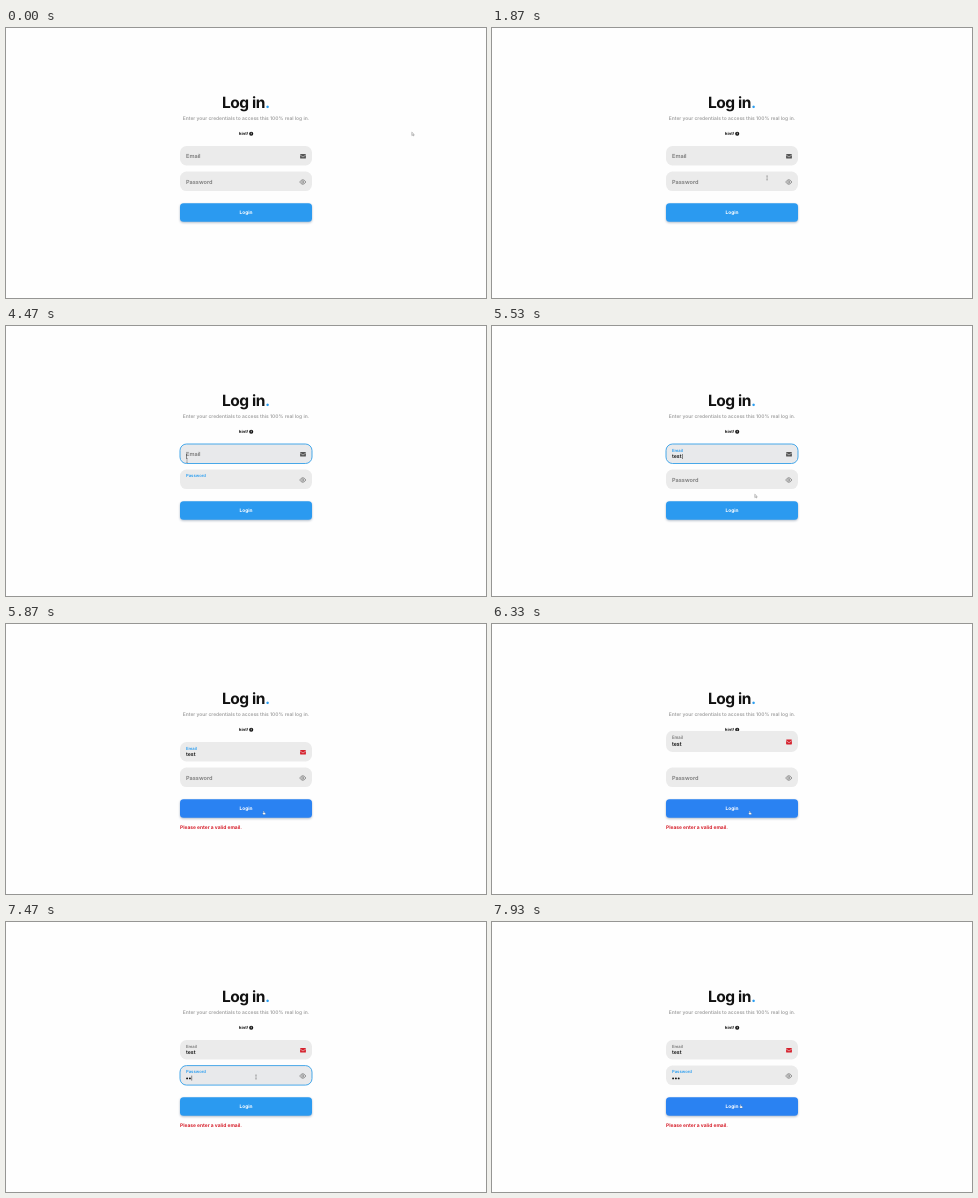
These frames come from a looping animation (480 by 270 pixels, 8 s). An HTML page:

```html
<!DOCTYPE html>
<html lang="en">
<head>
<meta charset="utf-8">
<title>Log in</title>
<style>
  html, body { margin: 0; width: 100%; height: 100%; overflow: hidden; background: #fefefe; }
  svg { display: block; width: 100vw; height: 100vh; }
  text { font-family: Inter, "Open Sans", sans-serif; font-weight: 600; text-rendering: geometricPrecision; }
  .bold { font-weight: 700; }
  .field { transform-box: fill-box; transform-origin: center bottom; }
  .box { fill: #ebebeb; }
  .focused .box { fill: #e8e9eb; stroke: #35a0e8; stroke-width: .9; }
  .label { font-size: 5.6px; }
  .value { font-size: 5.2px; fill: #111; }
  #button { filter: drop-shadow(0 1px 1px rgba(30, 60, 100, .35)); }
</style>
</head>
<body>
<svg viewBox="0 0 480 270">
  <defs>
    <g id="envelope">
      <rect x="-2.9" y="-2.2" width="5.8" height="4.5" rx=".6"/>
      <path d="M-2.9-1.2L0 .8 2.9-1.2" fill="none" stroke="#ebebeb" stroke-width=".55"/>
    </g>
    <g id="eye" fill="none" stroke="#666" stroke-width=".65">
      <path d="M-3.1 0Q0-4.6 3.1 0Q0 4.6-3.1 0Z"/>
      <circle r="1.1"/>
    </g>
  </defs>

  <text class="bold" x="216" y="80.2" font-size="15.5" letter-spacing="-.45" fill="#111">Log in<tspan fill="#2a9df0">.</tspan></text>
  <text x="240" y="91.5" font-size="4.92" text-anchor="middle" fill="#a2a2a2">Enter your credentials to access this 100% real log in.</text>
  <text class="bold" x="232.8" y="107.3" font-size="4.2" fill="#111">hint!</text>
  <circle cx="245.2" cy="105.8" r="2.05" fill="#111"/>
  <text class="bold" x="245.2" y="107" font-size="3.2" text-anchor="middle" fill="#fff">?</text>

  <g id="email" class="field">
    <rect class="box" x="174" y="118" width="132" height="19.5" rx="6.5"/>
    <text class="label">Email</text>
    <text class="value" x="180" y="132.3"></text>
    <rect class="caret" y="128" width=".5" height="5" fill="#222"/>
    <use id="mail" href="#envelope" x="297" y="128.2"/>
  </g>

  <g id="password" class="field">
    <rect class="box" x="174" y="143.6" width="132" height="19.5" rx="6.5"/>
    <text class="label">Password</text>
    <g class="dots" fill="#111">
      <circle cx="181.1" cy="156.4" r=".95"/>
      <circle cx="183.9" cy="156.4" r=".95"/>
      <circle cx="186.7" cy="156.4" r=".95"/>
    </g>
    <rect class="caret" y="153.6" width=".5" height="5" fill="#222"/>
    <use href="#eye" x="296.8" y="154"/>
  </g>

  <rect id="button" x="174" y="175.2" width="132" height="18.6" rx="3.5"/>
  <text class="bold" x="240" y="186" font-size="4.8" text-anchor="middle" fill="#fff">Login</text>
  <text id="error" class="bold" x="174" y="205.1" font-size="4.9" fill="#d6212d">Please enter a valid email.</text>

  <g id="cursor">
    <path id="arrow" d="M-1.2-1.8V1.5L-.4.8 .2 2 .8 1.7 .3.6H1.3Z" fill="#fff" stroke="#777" stroke-width=".45"/>
    <path id="beam" d="M-.8-2H.8M-.8 2H.8M0-2V2" fill="none" stroke="#777" stroke-width=".5"/>
    <path id="hand" d="M-.6-1.9H.1V-.5L1.4-.1V1.6H-.9L-1.5.1-.6 0Z" fill="#fff" stroke="#456" stroke-width=".2"/>
  </g>
</svg>

<script>
const LOOP = 8000, FPS = 15;
const BLUE = [42, 157, 240], GREY = [122, 122, 122];
const $ = selector => document.querySelector(selector);
const show = (el, on) => { el.style.display = on ? '' : 'none'; };
const mix = (a, b, k) => a + (b - a) * k;
const mixColor = (a, b, k) => `rgb(${a.map((v, i) => mix(v, b[i], k))})`;
const ease = k => k * k * (3 - 2 * k);

// Alternating on/off times give a value that glides between 0 and 1.
const glide = (t, times, length = 200) => times.reduce((sum, at, i) =>
  sum + (i % 2 ? -1 : 1) * ease(Math.min(1, Math.max(0, (t - at) / length))), 0);
const isOn = (t, times) => times.filter(at => t >= at).length % 2 === 1;

const fields = [
  { el: $('#email'), top: 118, focus: [2660, 3530, 4465, 5865], raised: [2660, 3530, 4465],
    keys: [4725, 4865, 5065, 5265], step: [0, 2.1, 5.2, 8.1, 10.2] },
  { el: $('#password'), top: 143.6, focus: [3530, 4465, 7065, 7930], raised: [3530, 4465, 7065],
    keys: [7265, 7395, 7530], step: [0, 2.8, 5.6, 8.4] }
];

// time, x, y
const path = [
  [65, 407, 106], [200, 372, 130], [265, 353, 143], [400, 353, 143],
  [600, 341, 112], [800, 325, 68], [900, 332, 44], [1000, 346, 36],
  [1265, 346, 36], [1333, 362, 86], [1533, 362, 86], [1867, 275, 150],
  [2200, 232, 129], [3133, 232, 129], [3467, 257, 157], [3800, 256, 157],
  [4067, 181, 134.5], [5265, 181, 134.5], [5533, 264, 170], [5733, 258, 189],
  [6400, 258, 189], [6800, 252, 163], [6933, 250, 155], [7530, 250, 155],
  [7800, 249, 184.5], [LOOP, 249, 184.5]
];

function cursorAt(t) {
  const i = path.findIndex(point => point[0] > t);
  if (i < 1) return path[i < 0 ? path.length - 1 : 0].slice(1);
  const [t0, x0, y0] = path[i - 1], [t1, x1, y1] = path[i];
  const k = (t - t0) / (t1 - t0);
  return [mix(x0, x1, k), mix(y0, y1, k)];
}

const rise = 'cubic-bezier(.215,.61,.355,1)', fall = 'cubic-bezier(.755,.05,.855,.06)';
const pose = (offset, y, scale, easing) =>
  ({ offset, transform: `translateY(${y}px) scaleY(${scale})`, easing });
const bounce = $('#email').animate([
  pose(0, 0, 1, rise), pose(.2, 0, 1, rise), pose(.4, -9.4, 1.1, fall),
  pose(.43, -9.4, 1.1, fall), pose(.53, 0, 1, rise), pose(.7, -4.7, 1.05, fall),
  pose(.8, 0, .95, rise), pose(.9, -1.25, 1.02, rise), pose(1, 0, 1, rise)
], { duration: 1000, fill: 'both' });
bounce.pause();

function drawField(field, t) {
  const { el, top, focus, raised, keys, step } = field;
  const focused = isOn(t, focus), lift = glide(t, raised);
  const typed = keys.filter(at => t >= at).length;
  el.classList.toggle('focused', focused);

  const label = el.querySelector('.label');
  label.setAttribute('transform',
    `translate(180 ${top + mix(12, 7.8, lift)}) scale(${mix(1, .75, lift)})`);
  label.style.fill = mixColor(GREY, BLUE, glide(t, focus));

  const value = el.querySelector('.value'), dots = el.querySelector('.dots');
  if (value) value.textContent = 'test'.slice(0, typed);
  if (dots) [...dots.children].forEach((dot, i) => show(dot, i < typed));

  const caret = el.querySelector('.caret');
  const lastEvent = Math.max(0, ...[...focus, ...keys].filter(at => at <= t));
  caret.setAttribute('x', 180 + step[typed]);
  show(caret, focused && (t - lastEvent) % 1000 < 500);
}

function draw(now) {
  const t = Math.floor((now % LOOP + 5) * FPS / 1000) * 1000 / FPS;
  fields.forEach(field => drawField(field, t));
  bounce.currentTime = Math.min(1000, Math.max(0, t - 5930));

  const failed = t >= 5865;
  $('#mail').style.fill = failed ? '#d6212d' : '#555';
  show($('#error'), failed);

  const [x, y] = cursorAt(t);
  const within = (top, bottom) => x > 174 && x < 306 && y > top && y < bottom;
  const overButton = within(175, 194);
  const overField = within(118, 138) || within(143, 164);
  $('#cursor').setAttribute('transform', `translate(${x} ${y})`);
  show($('#cursor'), t < 4725 || t >= 5265);
  show($('#hand'), overButton);
  show($('#beam'), overField);
  show($('#arrow'), !overButton && !overField);
  $('#button').style.fill = overButton ? '#2a82f2' : '#2b9af0';
}

const start = performance.now();
function frame() {
  draw(performance.now() - start);
  requestAnimationFrame(frame);
}
frame();
</script>
</body>
</html>
```
